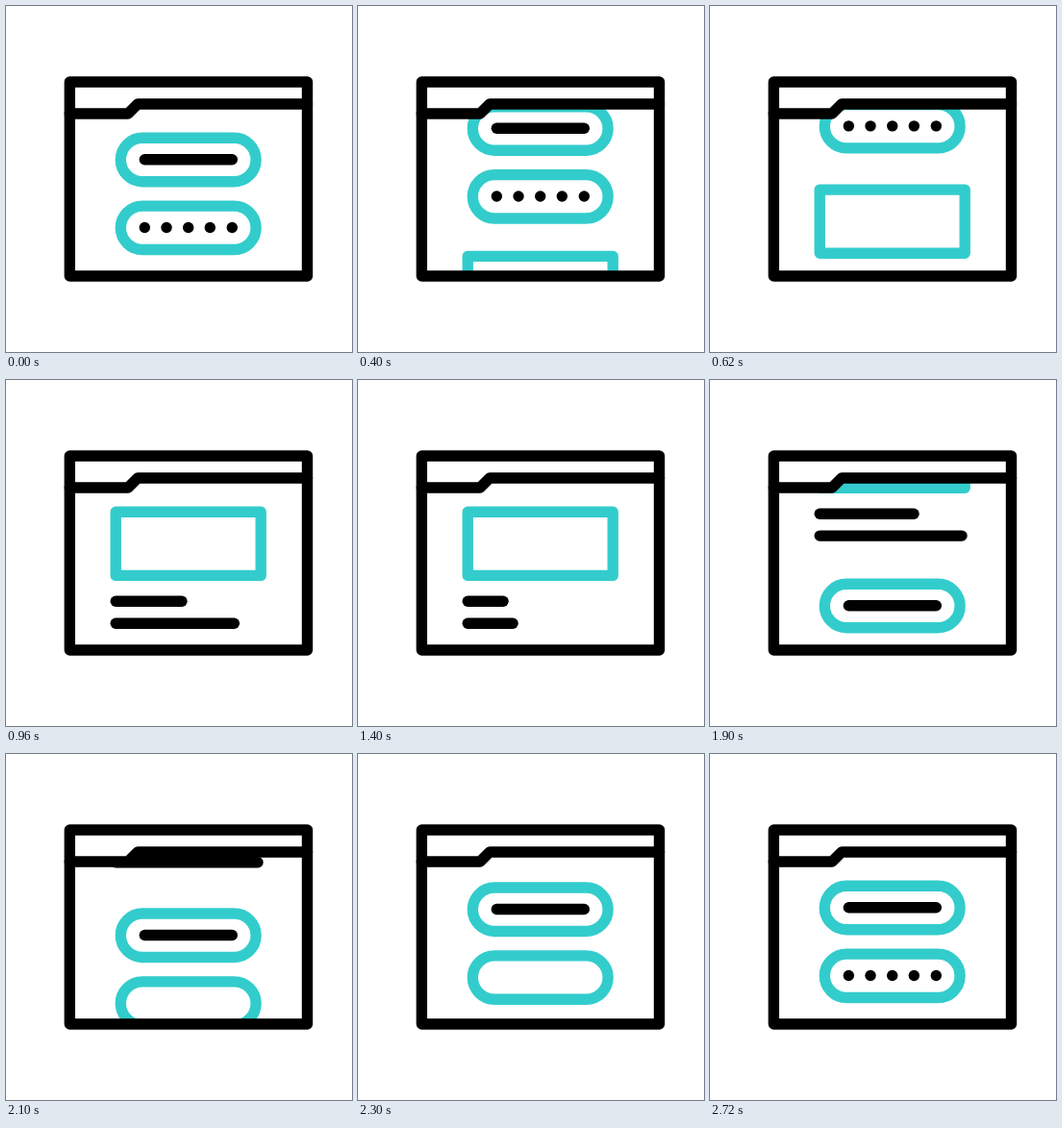
Write an HTML page with a canvas that moves like this. It is 360 by 360 pixels and loops after 3000 ms.

```html
<!DOCTYPE html>
<html>
<head>
<meta charset="utf-8">
<style>
  html, body { margin: 0; width: 100%; height: 100%; overflow: hidden; background: #fff; }
  canvas { display: block; width: 360px; height: 360px; }
</style>
</head>
<body>
<canvas id="stage" width="360" height="360"></canvas>
<script>
const ctx = document.getElementById('stage').getContext('2d');
const LOOP = 3000, BLACK = '#000', TEAL = '#33cccc', STROKE = 11.4;
const DOTS_X = [144.3, 167, 189.7, 212.3, 235.3];

const ease = (t, start, duration) => {
  const u = Math.min(1, Math.max(0, (t - start) / duration));
  return u * u * (3 - 2 * u);
};

function stroke(color, points) {
  ctx.strokeStyle = color;
  ctx.beginPath();
  points.forEach(([x, y]) => ctx.lineTo(x, y));
  ctx.stroke();
}

function outline(color, x, y, w, h, radius = 0) {
  ctx.strokeStyle = color;
  ctx.beginPath();
  if (radius) ctx.roundRect(x, y, w, h, radius);
  else ctx.rect(x, y, w, h);
  ctx.stroke();
}

function drawForm(offset, dotCount) {
  const top = 137.3 + offset;
  outline(TEAL, 119.3, top, 140.8, 45.4, 22.7);
  outline(TEAL, 119.3, top + 70.8, 140.8, 45.4, 22.7);
  stroke(BLACK, [[144.3, top + 22.5], [235.3, top + 22.5]]);
  ctx.fillStyle = BLACK;
  DOTS_X.slice(0, dotCount).forEach(x => {
    ctx.beginPath();
    ctx.arc(x, top + 93.2, 5.7, 0, Math.PI * 2);
    ctx.fill();
  });
}

function drawArticle(t, offset) {
  outline(TEAL, 114.2, 137.2 + offset, 151, 66.2);
  // Each line shortens, then grows back to its full length.
  const lineEnd = (full, dip, start, half) =>
    full - dip * (ease(t, start, half) - ease(t, start + half, half));
  stroke(BLACK, [[114.2, 230.3 + offset], [lineEnd(212, 72, 725, 542), 230.3 + offset]]);
  stroke(BLACK, [[114.2, 253.2 + offset], [lineEnd(262, 108, 800, 520), 253.2 + offset]]);
}

function drawWindow() {
  outline(BLACK, 66.3, 79, 247.2, 202);
  stroke(BLACK, [[66.3, 112], [127, 112], [137, 102], [313.5, 102]]);
}

function draw(t) {
  ctx.fillStyle = '#fff';
  ctx.fillRect(0, 0, 360, 360);
  ctx.lineWidth = STROKE;
  ctx.lineCap = ctx.lineJoin = 'round';

  const first = ease(t, 200, 700), second = ease(t, 1400, 960);
  ctx.save();
  ctx.beginPath();
  [[66, 112], [127, 112], [137, 102], [313, 102], [313, 281], [66, 281]]
    .forEach(([x, y]) => ctx.lineTo(x, y));
  ctx.clip();
  if (t < 900) drawForm(-162.5 * first, 5);
  drawArticle(t, 154 * (1 - first) - 171 * second);
  if (t >= 1400) {
    const typed = Math.max(0, Math.min(5, Math.floor((t - 2220) / 100)));
    drawForm(160.5 * (1 - second), typed);
  }
  ctx.restore();
  drawWindow();
}

function tick() {
  draw(performance.now() % LOOP);
  requestAnimationFrame(tick);
}
tick();
</script>
</body>
</html>
```
